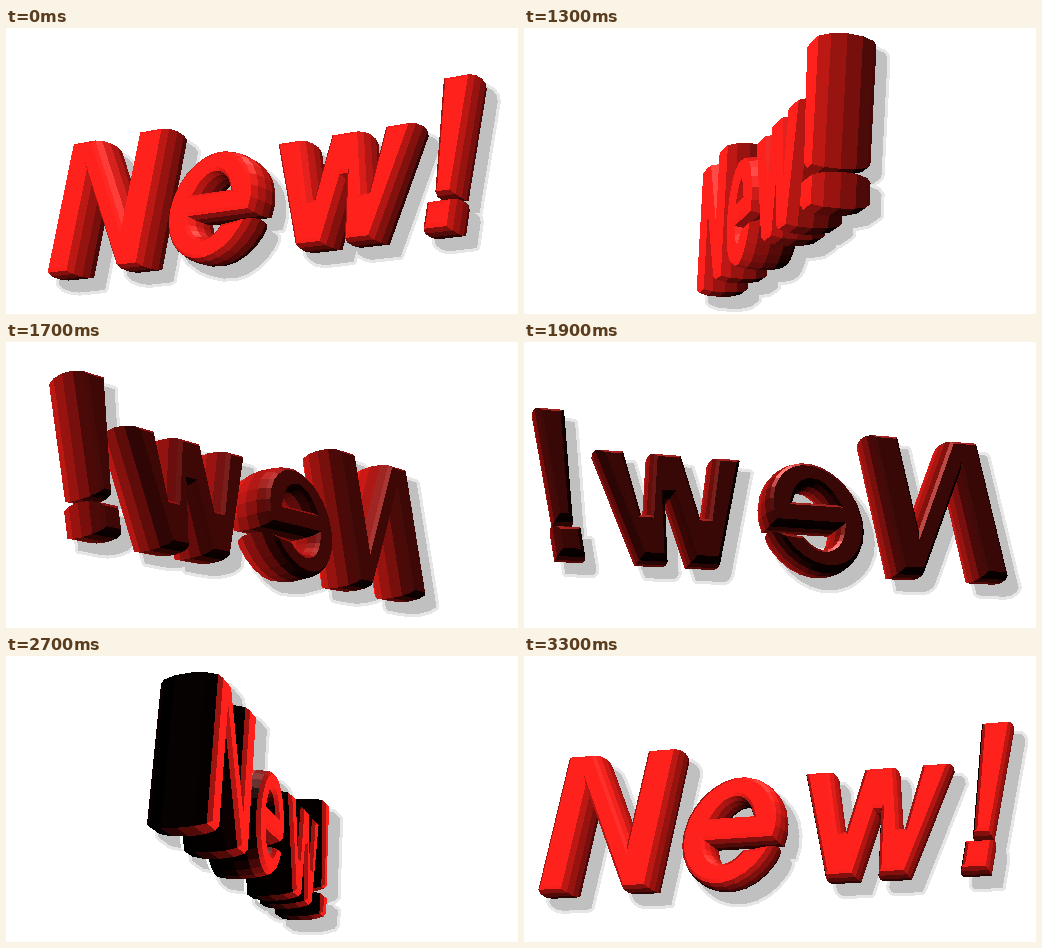
An HTML page with a canvas that plays this animation: 512x286 px, repeating every 3.4 s.

```html
<!DOCTYPE html>
<html lang="en">
<head>
<meta charset="utf-8">
<title>New!</title>
<style>
  html, body { margin: 0; width: 100%; height: 100%; overflow: hidden; background: #fff; }
  canvas { display: block; width: 512px; height: 286px; }
</style>
</head>
<body>
<canvas id="stage" width="512" height="286" role="img" aria-label="New!"></canvas>
<script>
const W = 512, H = 286;
const ctx = document.getElementById('stage').getContext('2d');
const image = ctx.createImageData(W, H);
const pixels = new Uint32Array(image.data.buffer);
const depth = new Float32Array(W * H);
const rad = Math.PI / 180;

// Camera, solid and lights
const CX = 249, CY = 158.5, DIST = 1260, TILT = 14.5 * rad;
const HALF = 28, BEVEL = 6, BANDS = 6;
const KEY = [0.33, -0.2, 0.92], TOP = [0.35, 0.9, -0.25];
const SHADOW = { x: 11, y: 12, ring: 3 };

const rgb = (r, g, b) => (255 << 24 | b << 16 | g << 8 | r) >>> 0;
const WHITE = rgb(255, 255, 255), GREY = rgb(192, 192, 192), PALE = rgb(230, 230, 230);

// Slanted elliptic arc of the letter e
function arc(rx, ry, from, to, steps) {
  return Array.from({ length: steps + 1 }, (_, i) => {
    const a = (from + (to - from) * i / steps) * rad;
    const y = ry * Math.sin(a);
    return [-38.5 + rx * Math.cos(a) + 0.2126 * y, y - 19];
  });
}

// Outlines run counterclockwise, holes clockwise
const glyphs = [
  [[[-244, -72], [-213, -72], [-192, 28], [-152, -72], [-124, -72],
    [-94, 72], [-127, 72], [-146, -17], [-181, 72], [-214, 72]]],
  [[...arc(50, 56, -12.4, 344, 26), ...arc(21, 31, 322, 202.8, 10)],
    arc(21, 31, 151, 29, 10)],
  [[[56, -72], [86, -72], [108, -10], [111, -10], [107, -72], [136, -72], [182, 35],
    [153, 35], [134, -26], [130, -26], [128, 35], [97, 35], [77, -26], [73, -26],
    [66, 35], [37, 35]]],
  [[[198, -39], [217, -39], [241, 72], [211, 72]]],
  [[[185, -72], [213, -72], [219, -42], [191, -42]]]
];

function inward(p, q) {
  const dx = q[0] - p[0], dy = q[1] - p[1], l = Math.hypot(dx, dy);
  return [-dy / l, dx / l];
}

function inset(loop, d) {
  const n = loop.length;
  return loop.map((p, i) => {
    const a = inward(loop[(i + n - 1) % n], p), b = inward(p, loop[(i + 1) % n]);
    const k = d / Math.max(0.15, 1 + a[0] * b[0] + a[1] * b[1]);
    return [p[0] + k * (a[0] + b[0]), p[1] + k * (a[1] + b[1])];
  });
}

const lift = (loop, z) => loop.map(p => [p[0], p[1], z]);

// Facets of the solid: { loops, normal }
function extrude(loops) {
  const facets = [];
  const rings = Array.from({ length: BANDS + 1 }, (_, i) => {
    const u = (i / BANDS - 0.5) * Math.PI;
    return loops.map(l => lift(inset(l, BEVEL * (1 - Math.cos(u))), HALF * Math.sin(u)));
  });
  facets.push({ loops: rings[0], normal: [0, 0, -1] });
  facets.push({ loops: rings[BANDS], normal: [0, 0, 1] });
  for (let i = 0; i < BANDS; i++) {
    const v = (2 * i + 1 - BANDS) / (BANDS - 1);
    const lean = (22 * v + 33 * v ** 5) * rad;
    loops.forEach((loop, j) => loop.forEach((p, k) => {
      const m = (k + 1) % loop.length, lo = rings[i][j], hi = rings[i + 1][j];
      const [nx, ny] = inward(p, loop[m]);
      facets.push({
        loops: [[lo[k], lo[m], hi[m], hi[k]]],
        normal: [-nx * Math.cos(lean), -ny * Math.cos(lean), Math.sin(lean)]
      });
    }));
  }
  return facets;
}

const facets = glyphs.flatMap(extrude);
const dot = (a, b) => a[0] * b[0] + a[1] * b[1] + a[2] * b[2];
const facing = (a, b) => Math.max(0, dot(a, b));

function shade(n, view) {
  const half = view.map((v, i) => v + TOP[i]);
  const gloss = (facing(half, n) / Math.hypot(...half)) ** 20;
  const back = Math.max(0, -n[2]) * 0.07 * view[0];
  const lit = Math.min(1, 0.02 + back + 1.1 * facing(n, KEY) + 0.7 * facing(n, TOP)
    + 0.6 * gloss);
  return rgb(255 * lit, 33 * lit + 100 * gloss, 28 * lit + 100 * gloss);
}

function project([x, y, z], turn) {
  const c = Math.cos(turn), s = Math.sin(turn);
  const px = x * c - z * s, pz = x * s + z * c;
  const py = y * Math.cos(TILT) + pz * Math.sin(TILT);
  const w = DIST / (DIST - pz * Math.cos(TILT) + y * Math.sin(TILT));
  return [CX + px * w, CY - py * w, w];
}

// Scanline fill with a depth test
function fillFacet(loops, color) {
  let nx = 0, ny = 0, nw = 0, top = H, bottom = 0;
  const edges = [];
  for (const loop of loops) loop.forEach((p, i) => {
    const q = loop[(i + 1) % loop.length];
    nx += (p[1] - q[1]) * (p[2] + q[2]);
    ny += (p[2] - q[2]) * (p[0] + q[0]);
    nw += (p[0] - q[0]) * (p[1] + q[1]);
    top = Math.min(top, p[1]);
    bottom = Math.max(bottom, p[1]);
    edges.push([p, q]);
  });
  if (Math.abs(nw) < 1e-3) return;
  const [ox, oy, ow] = loops[0][0];
  for (let y = Math.max(0, Math.floor(top)); y <= Math.min(H - 1, bottom); y++) {
    const cy = y + 0.5, xs = [];
    for (const [p, q] of edges) {
      if (p[1] <= cy !== q[1] <= cy) {
        xs.push(p[0] + (cy - p[1]) / (q[1] - p[1]) * (q[0] - p[0]));
      }
    }
    xs.sort((a, b) => a - b);
    for (let i = 0; i + 1 < xs.length; i += 2) {
      const end = Math.min(W, xs[i + 1] - 0.5);
      for (let x = Math.max(0, Math.ceil(xs[i] - 0.5)); x < end; x++) {
        const w = ow - (nx * (x + 0.5 - ox) + ny * (cy - oy)) / nw;
        const at = y * W + x;
        if (w > depth[at]) {
          depth[at] = w;
          pixels[at] = color;
        }
      }
    }
  }
}

function castShadow() {
  const stamp = (x, y, r, color) => {
    for (let j = -r; j <= r; j++) for (let i = -r; i <= r; i++) {
      const sx = x + i, sy = y + j, at = sy * W + sx;
      if (i * i + j * j > r * r + 1 || sx < 0 || sx >= W || sy < 0 || sy >= H) continue;
      if (!depth[at]) pixels[at] = color;
    }
  };
  for (const [r, color] of [[SHADOW.ring, PALE], [0, GREY]]) {
    for (let y = 0; y < H; y++) for (let x = 0; x < W; x++) {
      if (depth[y * W + x]) stamp(x + SHADOW.x, y + SHADOW.y, r, color);
    }
  }
}

function draw(step) {
  const turn = (30 + 15 * step) * rad;
  const view = [
    Math.sin(turn) * Math.cos(TILT), -Math.sin(TILT), Math.cos(turn) * Math.cos(TILT)
  ];
  pixels.fill(WHITE);
  depth.fill(0);
  for (const { loops, normal } of facets) {
    fillFacet(loops.map(l => l.map(p => project(p, turn))), shade(normal, view));
  }
  castShadow();
  ctx.putImageData(image, 0, 0);
}

// A pause of 1100 ms, then 23 steps of 100 ms
let shown = -1;
function tick() {
  const t = performance.now() % 3400;
  const step = t < 1100 ? 0 : Math.floor((t - 1000) / 100);
  if (step !== shown) draw(shown = step);
  requestAnimationFrame(tick);
}
tick();
</script>
</body>
</html>
```
